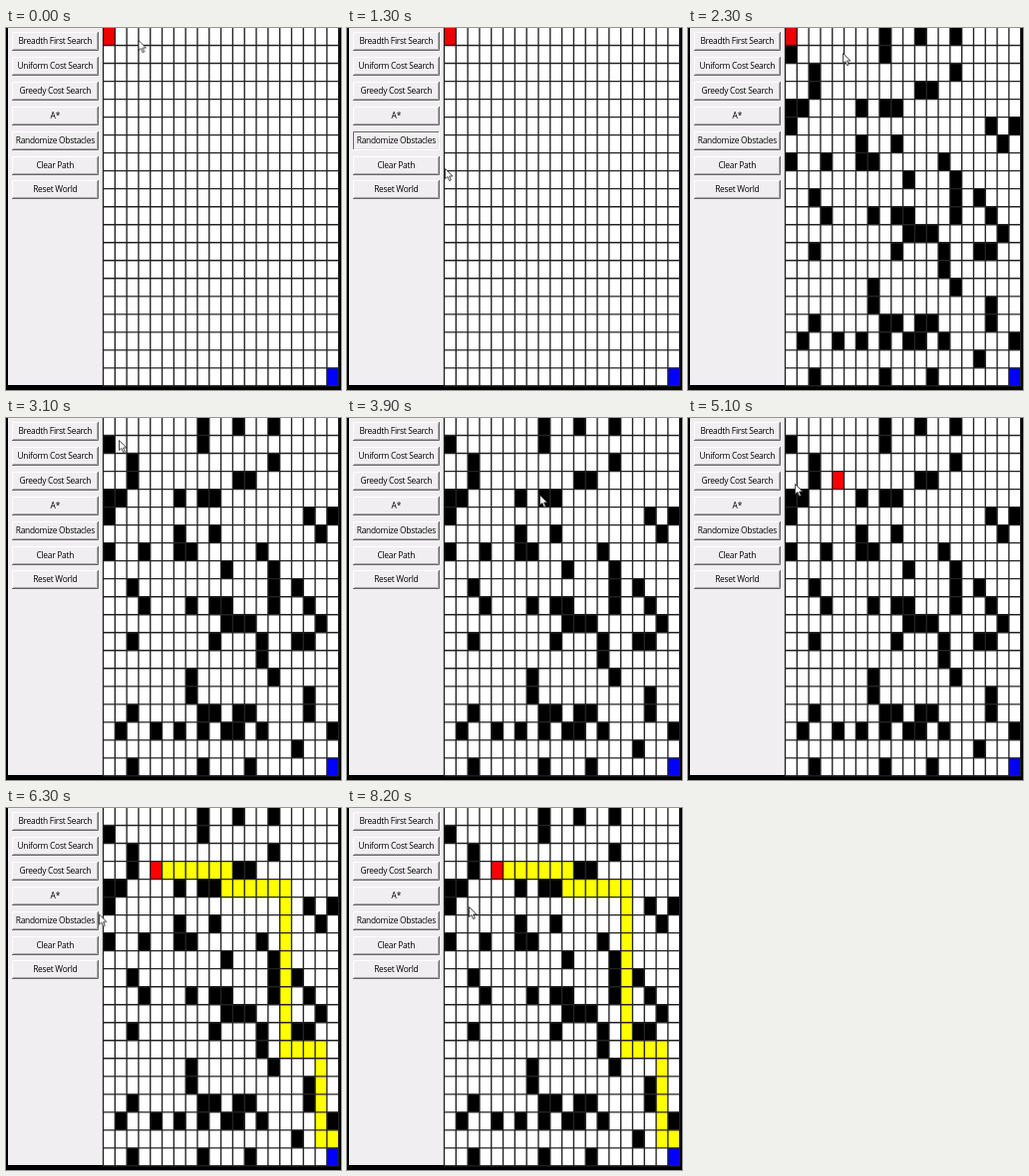
An HTML page for the animation above (8300 ms loop, 336 px wide and 364 px high).

```html
<!DOCTYPE html>
<html lang="en">
<head>
<meta charset="utf-8">
<title>Grid path search</title>
<style>
html, body { margin: 0; width: 100%; height: 100%; overflow: hidden; background: #000; }
svg { display: block; width: 336px; height: 364px; }
text { font: 8.4px "Open Sans", "Noto Sans", sans-serif; letter-spacing: -.25px; fill: #000; text-anchor: middle; }
.line { fill: none; stroke: #222; stroke-width: 1.35; }
.anim { animation: 8.3s step-end infinite; }
#start { animation-name: start; }
#walls { animation-name: walls; }
#moved { animation-name: moved; }
#path { animation-name: path; }
.press-random { animation-name: pressRandom; }
.press-greedy { animation-name: pressGreedy; }
#cursor { animation: cursor 8.3s infinite; }

@keyframes start { 0% { visibility: visible } 34.94%, 100% { visibility: hidden } }
@keyframes walls { 0% { visibility: hidden } 16.867%, 100% { visibility: visible } }
@keyframes moved { 0% { visibility: hidden } 53.012%, 100% { visibility: visible } }
@keyframes path { 0% { visibility: hidden } 74.699%, 100% { visibility: visible } }
@keyframes pressRandom {
  0% { visibility: hidden } 15.663% { visibility: visible } 16.867%, 100% { visibility: hidden }
}
@keyframes pressGreedy {
  0% { visibility: hidden } 73.494% { visibility: visible } 74.699%, 100% { visibility: hidden }
}
/* the pointer is sampled every 100 ms */
@keyframes cursor {
  0% { transform: translate(132.5px, 12px); animation-timing-function: step-end }
  3.614% { transform: translate(132.5px, 12px); animation-timing-function: steps(7, start) }
  12.048% { transform: translate(98px, 141px); animation-timing-function: step-end }
  22.892% { transform: translate(98px, 141px); animation-timing-function: steps(3, start) }
  26.506% { transform: translate(161px, 45px); animation-timing-function: steps(2, start) }
  28.916% { transform: translate(155px, 25px); animation-timing-function: steps(4, start) }
  33.735% { transform: translate(103px, 15px); animation-timing-function: step-end }
  37.349% { transform: translate(103px, 15px); animation-timing-function: steps(9, start) }
  48.193% { transform: translate(193px, 77px); animation-timing-function: step-end }
  56.627% { transform: translate(193px, 77px); animation-timing-function: steps(5, start) }
  62.651% { transform: translate(107px, 66px); animation-timing-function: steps(4, start) }
  67.47% { transform: translate(93px, 106.5px); animation-timing-function: step-end }
  98.795%, 100% { transform: translate(122px, 99px); animation-timing-function: step-end }
}
</style>
</head>
<body>
<svg viewBox="0 0 336 364">
  <rect width="336" height="364"/>
  <rect x="2" width="95" height="359" fill="#f0eef0"/>
  <rect x="97" width="236.5" height="359.5" fill="#fff"/>
  <g id="buttons"></g>
  <g id="start" class="anim" fill="#f00000"></g>
  <g id="walls" class="anim" fill="#000"></g>
  <g id="path" class="anim" fill="#ff0"></g>
  <g id="moved" class="anim" fill="#f00"></g>
  <g id="goal" fill="#00f"></g>
  <path id="grid" class="line"/>
  <path id="cursor" d="M.5 .5V10.6L2.8 8.5L4.6 12.6L6.3 11.9L4.6 8H7.8Z" fill="#fff" stroke="#333" stroke-width=".9"/>
</svg>
<script>
const $ = id => document.getElementById(id);
// centres of the grid lines
const colX = c => 97.5 + 11.81 * c;
const rowY = r => 18.02 * r - .5;

// fills a block of cells, w columns by h rows
function fill(id, c, r, w = 1, h = 1) {
  const x = colX(c), y = rowY(r);
  $(id).innerHTML += `<rect x="${x}" y="${y}" width="${colX(c + w) - x}" height="${rowY(r + h) - y}"/>`;
}

let lines = '';
for (let i = 0; i <= 20; i++) {
  lines += `M${colX(i)} 0V360`;
  if (i) lines += `M97 ${rowY(i)}H334`;
}
$('grid').setAttribute('d', lines);

const walls = [
  [8, 11, 14], [0, 8], [2, 14], [2, 11, 12], [0, 1, 6, 8, 9],
  [0, 17, 19], [6, 9, 18], [0, 3, 6, 7, 13], [10, 14], [2, 14, 16],
  [3, 7, 9, 10, 14, 17], [10, 11, 12, 18], [2, 9, 13, 16, 17], [13], [7, 14],
  [7, 17], [2, 8, 9, 11, 12, 17], [1, 4, 6, 8, 10, 11, 13, 19], [16], [2, 8, 12]
];
walls.forEach((cols, r) => cols.forEach(c => fill('walls', c, r)));

fill('start', 0, 0);
fill('moved', 4, 3);
fill('goal', 19, 19);
fill('path', 5, 3, 6);
fill('path', 10, 4, 6);
fill('path', 15, 5, 1, 9);
fill('path', 16, 13, 3);
fill('path', 18, 14, 1, 5);
fill('path', 19, 18);

const labels = ['Breadth First Search', 'Uniform Cost Search', 'Greedy Cost Search', 'A*',
  'Randomize Obstacles', 'Clear Path', 'Reset World'];
const pressed = { 2: 'press-greedy', 4: 'press-random' };

function bevel(y, light, dark, inner) {
  return `<path d="M6.5 ${y + 18}V${y + .5}H92" stroke="${light}"/>
    <path d="M7 ${y + 17.5}H91.5V${y + 1}" stroke="${inner}"/>
    <path d="M6 ${y + 18.5}H92.5V${y}" stroke="${dark}"/>`;
}

$('buttons').innerHTML = labels.map((label, i) => {
  const y = Math.round(4 + 24.9 * i);
  const down = pressed[i]
    ? `<g class="anim ${pressed[i]}"><rect x="6" y="${y}" width="87" height="19" fill="#f0eef0"/>${bevel(y, '#696969', '#fff', '#e3e3e3')}</g>`
    : '';
  return `<g fill="none">${bevel(y, '#fff', '#696969', '#a8a8a8')}${down}</g>
    <text x="49.3" y="${y + 12.4}">${label}</text>`;
}).join('');
</script>
</body>
</html>
```
